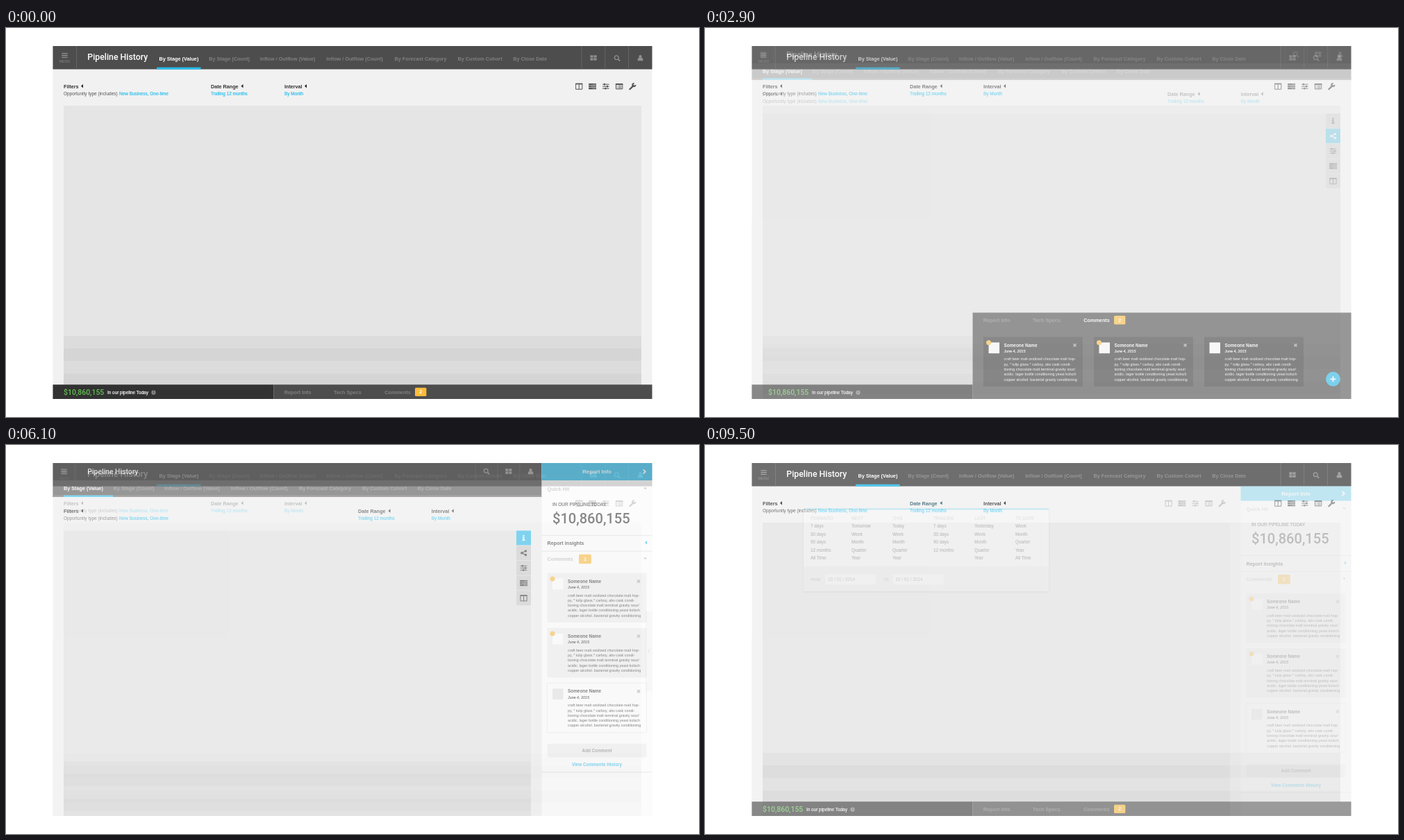
Write an HTML page that moves like this. It is 998x561 px and loops after 9600 ms.

```html
<!DOCTYPE html>
<html lang="en">
<head>
<meta charset="utf-8">
<title>Pipeline History</title>
<style>
  html, body { margin: 0; height: 100%; overflow: hidden; background: #fff; }
  svg { display: block; width: 998px; height: 561px; }
  text { font-family: "Liberation Sans", Arial, sans-serif; white-space: pre; }
  .bold { font-weight: 700; }
  .medium { stroke-width: .18px; }
  .italic { font-style: italic; stroke-width: .15px; }
  .roboto { font-family: Roboto, sans-serif; font-weight: 500; }
  .mid { text-anchor: middle; }
  .slide { opacity: 0; animation: fade 9600ms step-end infinite; }
  @keyframes fade {
    0% { opacity: 1; }
    5.2083% { opacity: .75; }
    6.25% { opacity: .5; }
    7.2916% { opacity: .25; }
    8.3333% { opacity: 0; }
    96.875% { opacity: .25; }
    97.9166% { opacity: .5; }
    98.9583% { opacity: .75; }
    100% { opacity: 1; }
  }
</style>
</head>
<body>
<svg id="stage" viewBox="0 0 998 561">
  <defs>
    <filter id="shadow" x="-10%" y="-10%" width="120%" height="125%">
      <feDropShadow dx="0" dy="1" stdDeviation="1.5" flood-opacity=".25"/>
    </filter>
  </defs>
</svg>
<script>
const LEFT = 67.5, RIGHT = 930.5, TOP = 26, BOTTOM = 535, SIDE = 771.5;
const BLUE = '#27bdee', YELLOW = '#fcbc3c', DARK = '#323232', MID = '#4d4d4d';
const DIM = '#808080', PALE = '#b8b8b8', INK = '#333';

// Basic shapes; text is placed by the middle of its capitals.
const box = (x1, y1, x2, y2, fill, more = '') =>
  `<rect x="${x1}" y="${y1}" width="${x2 - x1}" height="${y2 - y1}" fill="${fill}" ${more}/>`;
const path = (d, color, width = 1, more = '') =>
  `<path d="${d}" fill="none" stroke="${color}" stroke-width="${width}" ${more}/>`;
const solid = (d, color) => `<path d="${d}" fill="${color}"/>`;
const dot = (x, y, r, fill) => `<circle cx="${x}" cy="${y}" r="${r}" fill="${fill}"/>`;
const text = (x, y, str, size = 7.25, fill = INK, cls = 'bold') => {
  const stroke = /medium|italic/.test(cls) ? ` stroke="${fill}"` : '';
  return `<text x="${x}" y="${y}" dy=".36em" font-size="${size}" fill="${fill}" class="${cls}"${stroke}>${str}</text>`;
};
const lines = (x, y, step, rows, ...style) =>
  rows.map((row, i) => text(x, y + i * step, row, ...style)).join('');
const at = (x, y, body) => `<g transform="translate(${x} ${y})">${body}</g>`;
const caretLeft = (x, y, c) => solid(`M${x - 1.5} ${y}l3 -2.7v5.4z`, c);
const caretDown = (x, y, c) => solid(`M${x - 2.6} ${y - 1.2}h5.2l-2.6 2.9z`, c);
const cross = (x, y, c) => path(`M${x - 2} ${y - 2}l4 4m0 -4l-4 4`, c, 1.5);
const badge = (x, y, w, h) =>
  box(x, y, x + w, y + h, YELLOW, 'rx="1.5"') + text(x + w / 2, y + h / 2, '2', 7, '#fff', 'bold mid');
const button = (x1, y1, x2, y2, fill, label, color = '#fff') =>
  box(x1, y1, x2, y2, fill, 'rx="2"') +
  text((x1 + x2) / 2, (y1 + y2) / 2, label, 6.3, color, 'bold mid');

const icons = {
  columns: c => path('M-4.6 -3.9h9.2v8h-9.2zM0 -4v8', c, 1) + box(-5, -4.4, 5, -2.8, c),
  servers: c => [-4.2, -1.2, 1.8].map((y, i) => box(-5.4, y, 5.4, y + 2.4, c) +
    path(`M${[1, -2, 0][i]} ${y + 1.2}H4.4`, '#bbb', .6)).join(''),
  sliders: c => [-3, 0, 3].map((y, i) => path(`M-4.8 ${y}h9.6`, c, 1) +
    box([-2.8, 1.2, -1.4][i], y - 1.3, [-.8, 3.2, .6][i], y + 1.3, c)).join(''),
  list: c => path('M-4.7 -3.6h9.4v7.4h-9.4z', c, 1) + box(-5.2, -4.1, 5.2, -2.2, c) +
    path('M-3.4 -1h1m1 0h4.8M-3.4 .8h1m1 0h4.8M-3.4 2.5h1m1 0h4.8', c, .8),
  wrench: c => path('M-4 4L1.2 -1.1', c, 2.3, 'stroke-linecap="round"') +
    path('M4.1 -2.2A2.2 2.2 0 1 1 2.2 -4.2', c, 1.8),
  info: c => dot(0, -3, 1.2, c) + solid('M-1.9 -1.2H1V2.8H2V4H-2V2.8H-1V0H-1.9z', c),
  share: c => path('M3 -2.9L-2.7 0L3 2.9', c, 1.2) +
    dot(-2.7, 0, 1.8, c) + dot(2.9, -2.8, 1.7, c) + dot(2.9, 2.8, 1.7, c),
  grid: c => box(-4.6, -3.7, -.4, -.4, c) + box(.4, -3.7, 4.6, -.4, c) +
    box(-4.6, .4, -.4, 3.7, c) + box(.4, .4, 4.6, 3.7, c),
  search: c => `<circle cx="-.7" cy="-.7" r="2.9" fill="none" stroke="${c}" stroke-width="1.3"/>` +
    path('M1.5 1.5L4.2 4.2', c, 1.7),
  user: c => dot(0, -1.9, 2.2, c) + solid('M-3.8 4.2V2.2Q-3.8 0 -1.8 0H1.8Q3.8 0 3.8 2.2V4.2z', c),
  menu: c => path('M-4.2 -2.8h8.4M-4.2 0h8.4M-4.2 2.8h8.4', c, 1.3)
};
const icon = (name, x, y, c) => at(x, y, icons[name](c));

const tabNames = ['By Stage (Value)', 'By Stage (Count)', 'Inflow / Outflow (Value)',
  'Inflow / Outflow (Count)', 'By Forecast Category', 'By Custom Cohort', 'By Close Date'];
const tabOffsets = [0, 71.7, 145.2, 240.8, 339, 430, 509.7];
const tabs = (x, y) => tabNames.map((name, i) =>
  text(x + tabOffsets[i], y, name, 7.25, i ? DIM : '#fff')).join('');

const tallHeader = () => box(LEFT, TOP, RIGHT, 59.5, MID) +
  path('M101.5 26V59.5M829 26V59.5M862.7 26V59.5M896.5 26V59.5', '#6b6b6b', .8) +
  icon('menu', 84.5, 39.5, '#8f8f8f') + text(84.5, 48, 'MENU', 5.4, '#858585', 'mid') +
  text(117.3, 42, 'Pipeline History', 12.3, '#fff', 'roboto') + tabs(220.5, 44) +
  box(217, 56.7, 280.5, 59.7, BLUE) +
  icon('grid', 846, 43, '#8f8f8f') + icon('search', 880, 43.5, '#8f8f8f') + icon('user', 913.5, 43, '#8f8f8f');

const smallHeader = right => box(LEFT, TOP, right, 51, DARK) + box(LEFT, 51, right, 75, MID) +
  box(LEFT, 72.5, right, 75, '#6d6666') + box(83, 72.5, 154, 75, BLUE) +
  path(`M99 26V51M${right - 95.3} 26v25M${right - 63.5} 26v25M${right - 31.7} 26v25`, '#505050', .8) +
  icon('menu', 83.3, 38, '#8f8f8f') +
  text(117.3, 38, 'Pipeline History', 10.35, '#fff', 'roboto') + tabs(83, 62) +
  icon('search', right - 79.5, 38, '#8f8f8f') + icon('grid', right - 47.7, 38, '#8f8f8f') +
  icon('user', right - 16, 38, '#8f8f8f');

const filter = (x, y, name, arrowX, value, open) =>
  text(x, y, name, 7.2, open ? BLUE : INK) +
  (open ? caretDown : caretLeft)(arrowX, y - .3, open ? BLUE : '#222') +
  text(x, y + 10.6, value, 6.45, BLUE, 'medium');
const filters = (y, dateX, intervalX, open) =>
  filter(83, y, 'Filters', 109.5, '') +
  text(83, y + 10.6, 'Opportunity type (includes)', 6.5, '#555', '') +
  text(163, y + 10.6, 'New Business, One-time', 6.45, BLUE, 'medium') +
  filter(dateX, y, 'Date Range', dateX + 45, 'Trailing 12 months', open === 'date') +
  filter(intervalX, y, 'Interval', intervalX + 30.5, 'By Month', open === 'interval');

const content = (top, right, bandTop) => {
  let out = box(83, top, right, BOTTOM, '#e5e5e5');
  for (let i = 0; i < 5; i++) {
    const y = bandTop + i * 18.1;
    out += box(83, y, right, Math.min(y + 18.1, BOTTOM), i % 2 ? '#d5d5d5' : '#dcdcdc');
  }
  return out;
};

const tools = x => ['columns', 'servers', 'sliders', 'list', 'wrench'].map((name, i) =>
  icon(name, x + i * 19.3, 84.2, '#555')).join('');
const tiles = (x, active) => ['info', 'share', 'sliders', 'servers', 'columns'].map((name, i) => {
  const y = 123.5 + i * 21.7, on = name === active;
  return box(x, y, x + 21, y + 20.9, on ? BLUE : '#cacaca') +
    icon(name, x + 10.5, y + 10.5, on ? '#fff' : INK);
}).join('');

const backdrop = box(LEFT, TOP, RIGHT, BOTTOM, '#f1f1f1');
const tallPage = (open, sidebar) => backdrop + tallHeader() + filters(84, 295, 401, open) +
  tools(sidebar ? 667.6 : 825.2) + content(112, sidebar ? 756 : 915, 444);
const smallPage = (right, active) => backdrop + smallHeader(right) +
  filters(95.3, right - 264.5, right - 158.8) + content(123.5, right - 15.5, 456) +
  tiles(right - 36.5, active);

const beer = ['craft beer malt oxidized chocolate malt hoppy, *',
  'tulip glass.* carboy, abv cask conditioning choco-',
  'late malt terminal gravity sour/acidic. lager bottle',
  'conditioning yeast kolsch copper alcohol. bacterial',
  'gravity conditioning tank hop back.ing, bacterial',
  'becher? mash tun black malt acid rest ibu filter', 'top-fermenting yeast mash tun.'];
const beerShifted = ['craft beer malt oxidized chocolate malt hoppy,',
  '* tulip glass.* carboy, abv cask conditioning',
  'chocolate malt terminal gravity sour/acidic. lager',
  'bottle cwonditioning yeast kolsch copper alcohol.',
  'bacterial gravity conditioning tank hop back.ing,',
  'bacterial becher? mash tun black malt acid rest', 'ibu filter top-fermenting yeast mash tun.'];
const beerShort = ['craft beer malt oxidized chocolate malt hop-',
  'py, * tulip glass.* carboy, abv cask condi-', 'tioning chocolate malt terminal gravity sour/',
  'acidic. lager bottle conditioning yeast kolsch', 'copper alcohol. bacterial gravity conditioning'];

const card = (x, y, fill, ink, avatar, isNew, more) => at(x, y,
  box(0, 0, 143, 71.5, fill, more) + box(7.5, 8, 23, 23.7, avatar) +
  (isNew ? dot(7.5, 8.3, 3.5, YELLOW) : '') +
  text(29.5, 11.8, 'Someone Name', 6.4, ink) +
  text(29.5, 20.4, 'June 4, 2015', 5.35, ink, 'italic') +
  lines(29.5, 32, 7.3, beerShort, 5.35, ink, '') + cross(131.5, 12, '#aaa'));

const footer = (shift = 0) => box(LEFT, 514.3, 385.5, BOTTOM, DARK) +
  text(83 + shift, 525, '$10,860,155', 10.5, '#62c152', 'roboto') +
  text(146 + shift, 526, 'In our pipeline Today', 6.4, '#fff', 'medium') +
  dot(212.5 + shift, 525.7, 3.1, '#858585') +
  text(212.5 + shift, 525.7, 'i', 4.6, DARK, 'bold mid');
const panel = (top, y, active) => box(385.5, top, RIGHT, BOTTOM, MID) +
  ['Report Info', 'Tech Specs', 'Comments'].map((name, i) =>
    text([400.8, 472, 545.3][i], y, name, 7.25, name === active ? '#fff' : DIM)).join('') +
  badge(589, y - 6.3, 16.4, 12.4);
const openPanel = active => footer() + panel(410.5, 421.3, active) +
  path('M400.5 431.3H915', '#5c5c5c', .8) +
  [400.5, 564.5, 718.5].map((x, i) => text(x, 450, 'LOREM IPSUM', 6.4, '#fff') +
    lines(x, 462.3, 8.3, i === 1 ? beerShifted : beer, 6.45, '#fff', '')).join('');
const commentPanel = () => footer(8) + panel(410.5, 421.3, 'Comments') +
  [401, 560, 719].map((x, i) => card(x, 445.5, '#383838', '#fff', '#fff', i < 2)).join('') +
  dot(904.5, 506.3, 10.5, BLUE) + path('M900.5 506.3h8m-4 -4v8', '#fff', 1.8);

const sideHeader = (top, bottom, title) => box(SIDE, top, RIGHT, BOTTOM, '#fff') +
  box(SIDE, top, RIGHT, bottom, BLUE) +
  text(851, (top + bottom) / 2 - .3, title, 7.8, '#fff', 'bold mid') +
  path(`M917.6 ${(top + bottom) / 2 - 3.2}l3.2 3.2l-3.2 3.2`, '#fff', 1.9);
const rule = y => path(`M${SIDE} ${y}H${RIGHT}`, '#dcdcdc', .9);
const section = (y, name, closed) => text(779.6, y, name, 7.2, closed ? INK : PALE) +
  (closed ? caretLeft(921.5, y - 1, BLUE) : caretDown(920.6, y - .7, PALE));

const reportSidebar = (top, bottom, shift) => sideHeader(top, bottom, 'Report Info') + at(0, shift,
  section(92.5, 'Quick Hit') + text(787, 115, 'IN OUR PIPELINE TODAY', 6.5, INK, 'medium') +
  text(787, 134.5, '$10,860,155', 20.1, INK, 'roboto') +
  rule(159.5) + section(171, 'Report Insights', true) + rule(182.3) +
  section(193.5, 'Comments') + badge(825, 187, 17.8, 13.5) +
  [0, 1, 2].map(i => i < 2
    ? card(779.5, 213.8 + i * 79.2, '#efefef', INK, '#fff', true)
    : card(779.5, 372.5, '#fff', INK, '#e3e3e3', false, 'stroke="#ececec"')).join('') +
  button(779.7, 460, 922.5, 479.5, '#efefef', 'Add Comment', '#858585') +
  text(851, 490.3, 'View Comments History', 6.3, BLUE, 'bold mid') + rule(501));

const field = (y, name, bottom, hint) => text(779.5, y, name, 6.2, '#222') +
  box(779.8, y + 7.6, 922.5, bottom, '#fff', 'stroke="#bdbdbd" stroke-width=".9"') +
  text(783.3, y + 13.8, hint, 5.4, '#666', '');
const check = (x, name, on) => box(x, 425.4, x + 7.6, 433, on ? BLUE : '#cacaca') +
  (on ? path(`M${x + 1.6} 429.2l1.7 1.8l3 -3.8`, '#fff', 1.2) : '') +
  text(x + 10.3, 429.4, name, 5.4, '#222');
const socialButton = (y, fill, name, textX, mark) =>
  box(779.7, y, 922.5, y + 19.6, fill, 'rx="2"') + mark + text(textX, y + 9.8, name, 6.3, '#fff');

const sharingSidebar = () => sideHeader(TOP, 51, 'Sharing') + section(63.5, 'Social') +
  socialButton(82, '#233f90', 'Mingrove', 841, box(832, 89, 837.7, 94.7, '#fff')) +
  socialButton(107, BLUE, 'Plovano', 845.5, dot(839.3, 117, 2.7, '#fff')) +
  rule(142.5) + section(154, 'Email Report') +
  field(176.6, 'From', 196.4, 'Your name (this should auto fill)') +
  field(207.3, 'To', 227, 'Recipient email') + field(238, 'Subject', 257.6, 'Pipeline History') +
  field(268.6, 'Message', 333, '') +
  button(779.7, 342.4, 843.5, 357, '#cacaca', 'Cancel', '#444') +
  button(859, 342.4, 922.5, 357, '#5cb950', 'Send') +
  rule(373) + section(384, 'Subscribe to Report', true) + rule(395.5) +
  section(407, 'Export Report') +
  check(779.8, 'CSV') + check(811.2, 'PDF', true) + check(843, 'PNG') +
  button(779.7, 441, 922.5, 460.7, BLUE, 'Export');

const handle = () => box(920.5, 240, RIGHT, 355, '#dedede') + path('M927 294l-2.6 3l2.6 3', '#888', 1);

const dropdown = (x1, x2, bottom, body) =>
  box(x1, 92, x2, bottom, '#fff', 'filter="url(#shadow)"') + body + box(x1, 91.5, x2, 93.3, BLUE);
const intervalMenu = () => dropdown(390.5, 442.5, 161,
  lines(401, 103.5, 11.45, ['Day', 'Week', 'Month', 'Quarter', 'Year'], 6.3, '#444', 'medium'));
const spans = ['Week', 'Month', 'Quarter', 'Year'];
const days = ['7 days', '30 days', '90 days', '12 months'];
const ranges = { 'FORWARD': [...days, 'All Time'], 'NEXT': ['Tomorrow', ...spans],
  'THIS': ['Today', ...spans], 'TRAILING': days, 'LAST': ['Yesterday', ...spans],
  'TO DATE': [...spans, 'All Time'] };
const dateField = (x, name, inputX) => text(x, 194.3, name, 4.9, '#999') +
  box(inputX, 186.5, inputX + 73.5, 201.5, '#fff') +
  text(inputX + 4, 194, '10 / 01 / 2014', 6.4, '#777', '');
const dateMenu = () => dropdown(142, 495, 211,
  Object.entries(ranges).map(([name, rows], i) => text(152 + i * 59, 105.6, name, 6.3, PALE) +
    lines(152 + i * 59, 117, 11.45, rows, 6.3, '#444', 'medium')).join('') +
  box(142, 175, 495, 211, '#ececec') + dateField(152, 'FROM', 173) + dateField(257.5, 'TO', 270.3));

const tallReport = open => tallPage(open, true) + reportSidebar(59.5, 80.5, 0);
const slides = [
  tallPage() + footer() + panel(514.3, 525),
  tallPage() + openPanel('Report Info'),
  tallPage() + openPanel('Tech Specs'),
  tallPage() + commentPanel(),
  smallPage(RIGHT, 'share'),
  smallPage(SIDE, 'share') + sharingSidebar(),
  smallPage(RIGHT, 'info'),
  smallPage(SIDE, 'info') + reportSidebar(TOP, 51, -29.2),
  tallPage() + handle(),
  tallReport(),
  tallReport('interval') + intervalMenu(),
  tallReport('date') + dateMenu()
];
document.getElementById('stage').insertAdjacentHTML('beforeend', slides.map((body, i) =>
  `<g class="slide" style="animation-delay:${i ? i * 800 - 9600 : 0}ms">${body}</g>`).join(''));
</script>
</body>
</html>
```
